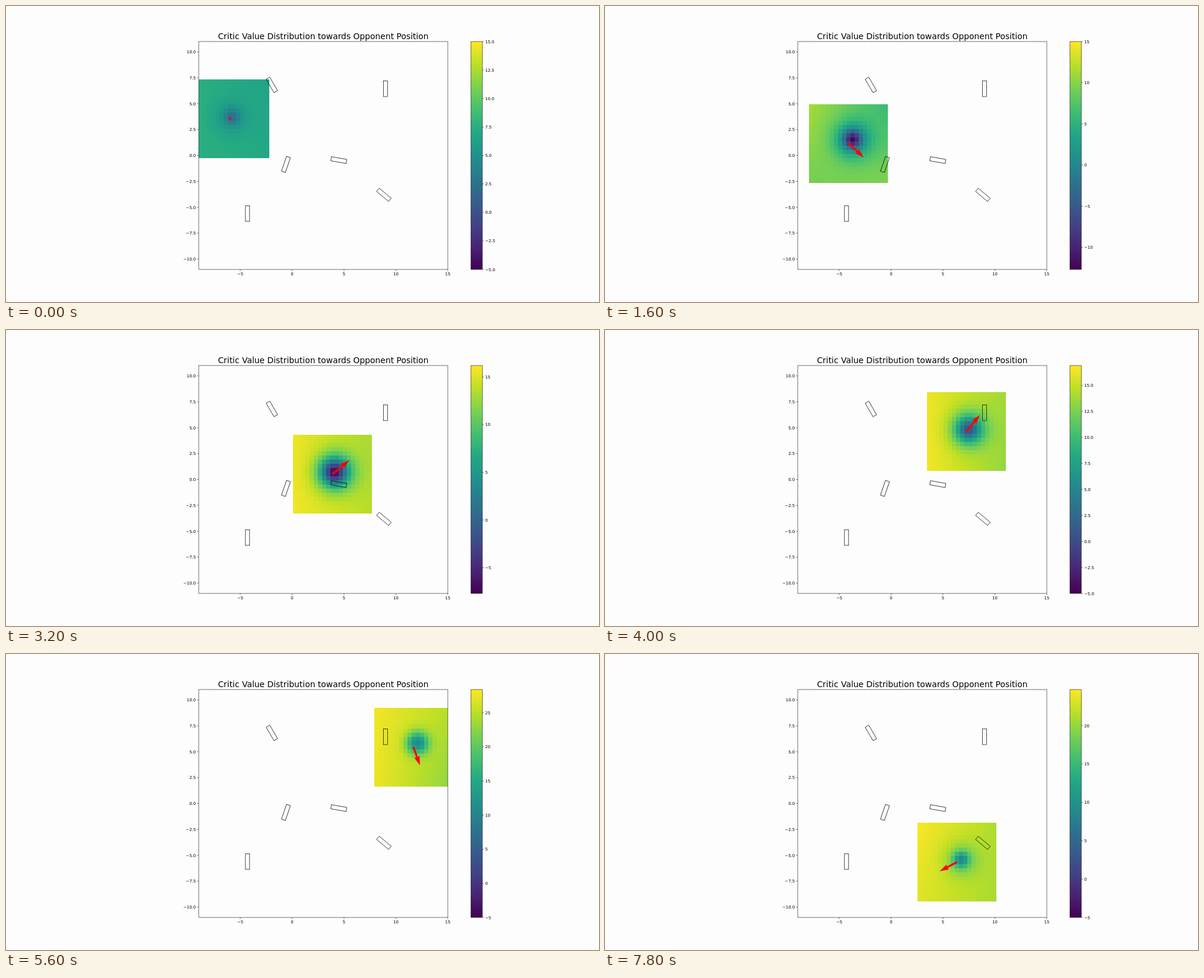
An HTML page for the animation above (8 s loop, 1000 by 500 pixels).

```html
<!DOCTYPE html>
<html lang="en">
<head>
<meta charset="utf-8">
<title>Critic value distribution</title>
<style>
  html, body { margin: 0; width: 100%; height: 100%; overflow: hidden; background: #fefdfe; }
  svg { display: block; width: 100vw; height: 100vh; }
  text { font-family: "DejaVu Sans", sans-serif; font-size: 6.94px; fill: #000; }
  .title { font-size: 13.89px; text-anchor: middle; }
  .mid { text-anchor: middle; }
  .end { text-anchor: end; }
  .line { fill: none; stroke: #000; stroke-width: .56; }
  .wall { fill: none; stroke: #000; stroke-width: .7; }
</style>
</head>
<body>
<svg viewBox="0 0 1000 500">
  <defs>
    <clipPath id="plot"><rect x="325" y="60" width="420" height="385"/></clipPath>
    <linearGradient id="scale" x1="0" y1="1" x2="0" y2="0"></linearGradient>
  </defs>
  <g clip-path="url(#plot)">
    <g id="patch" shape-rendering="crispEdges"></g>
    <g id="walls"></g>
    <path id="arrow" fill="#f00"/>
  </g>
  <rect class="line" x="325" y="60" width="420" height="385"/>
  <g id="axes"></g>
  <text class="title" x="535" y="55.8">Critic Value Distribution towards Opponent Position</text>
  <rect x="784" y="60" width="19.2" height="385" fill="url(#scale)"/>
  <rect class="line" x="784" y="60" width="19.2" height="385"/>
  <g id="ticks"></g>
</svg>
<script>
const LOOP = 8000, STEP = 200, N = 19, CELL = 7, PACE = 0.65;
const $ = id => document.getElementById(id);
const lerp = (a, b, u) => a + (b - a) * u;
const mix = (a, b, u) => a.map((v, i) => lerp(v, b[i], u));
const label = (v, digits) => v.toFixed(digits).replace("-", "\u2212");

const viridis = "440154 482475 414487 355f8d 2a788e 21918c 22a884 44bf70 7ad151 bddf26 fde725"
  .split(" ").map(h => [0, 2, 4].map(i => parseInt(h.slice(i, i + 2), 16)));

function color(v) {
  const s = Math.max(0, Math.min(0.9999, v)) * 10, i = Math.floor(s);
  return `rgb(${mix(viridis[i], viridis[i + 1], s - i).map(Math.round)})`;
}

// pos: patch centre; head: angle in degrees, length; range: colour limits;
// base: corner levels (tl, tr, bl, br); dip: offset x, y, then depth and width of two bells
const keys = [
  { t: 0,    pos: [377.5, 190],   head: [43, 0],     range: [-5, 15],      base: [.63, .585, .63, .6],  dip: [3, -3, .16, 9, .1, 20] },
  { t: 1600, pos: [410.5, 232],   head: [43, 35],    range: [-12.7, 15],   base: [.86, .68, .79, .8],   dip: [7, -7, .43, 10, .33, 22] },
  { t: 3200, pos: [550.5, 243.5], head: [-39.6, 37], range: [-7.7, 16.2],  base: [.97, .87, .98, .89],  dip: [3.5, -3.5, .45, 13, .46, 22] },
  { t: 4000, pos: [609.5, 171.5], head: [-51, 36],   range: [-5, 16.9],    base: [.97, .86, .98, .84],  dip: [3.5, -3.5, .3, 12, .36, 21] },
  { t: 5600, pos: [687, 157],     head: [70.5, 33],  range: [-5, 28.4],    base: [.98, .89, .97, .83],  dip: [6, -7, .25, 13, .2, 13] },
  { t: 7000, pos: [663.5, 285.5], head: [120.4, 33], range: [-5, 15],      base: [.86, .83, .91, .82],  dip: [7, -4, .4, 11, .22, 17] },
  { t: 7800, pos: [593.5, 351.5], head: [152, 33],   range: [-5, 24.7],    base: [.99, .88, .95, .87],  dip: [7, -4, .32, 9, .15, 20] }
];

const velocity = ([deg, len]) =>
  [Math.cos, Math.sin].map(f => f(deg * Math.PI / 180) * len * PACE / STEP);

// Hermite path whose end tangents follow the arrow
function glide(a, b, u) {
  const span = b.t - a.t, va = velocity(a.head), vb = velocity(b.head);
  const u2 = u * u, u3 = u2 * u, s = 3 * u2 - 2 * u3;
  return a.pos.map((p, i) => lerp(p, b.pos[i], s)
    + (u3 - 2 * u2 + u) * va[i] * span + (u3 - u2) * vb[i] * span);
}

function stateAt(t) {
  let i = 0;
  while (i < keys.length - 2 && t >= keys[i + 1].t) i++;
  const a = keys[i], b = keys[i + 1];
  const u = Math.min(1, (t - a.t) / (b.t - a.t));
  return {
    pos: glide(a, b, u),
    angle: lerp(a.head[0], b.head[0], u),
    length: lerp(a.head[1], b.head[1], u * u),
    range: mix(a.range, b.range, u),
    base: mix(a.base, b.base, u),
    dip: mix(a.dip, b.dip, u)
  };
}

function build() {
  $("scale").innerHTML = viridis.map((c, i) =>
    `<stop offset="${i / 10}" stop-color="rgb(${c})"/>`).join("");

  let cells = "";
  for (let j = 0; j < N; j++)
    for (let i = 0; i < N; i++)
      cells += `<rect x="${(i - N / 2) * CELL}" y="${(j - N / 2) * CELL}" width="${CELL}" height="${CELL}"/>`;
  $("patch").innerHTML = cells;

  const walls = [[448.4, 133.4, 60], [640, 139.8, 90], [472.1, 267.6, 109],
                 [561.2, 260.3, 10], [637.3, 319, 40], [407.3, 350.6, 90]];
  $("walls").innerHTML = walls.map(([x, y, r]) =>
    `<rect class="wall" x="-13.2" y="-3.5" width="26.4" height="7" transform="translate(${x} ${y}) rotate(${r})"/>`).join("");

  let axes = "";
  for (let v = -5; v <= 15; v += 5) {
    const x = 482.5 + v * 17.5;
    axes += `<path class="line" d="M${x} 445v2.5"/><text class="mid" x="${x}" y="455.1">${label(v, 0)}</text>`;
  }
  for (let v = -10; v <= 10; v += 2.5) {
    const y = 252.5 - v * 17.5;
    axes += `<path class="line" d="M325 ${y}h-2.5"/><text class="end" x="320.2" y="${y + 2.6}">${label(v, 1)}</text>`;
  }
  $("axes").innerHTML = axes;
}

function drawPatch({ pos, base, dip }) {
  const [tl, tr, bl, br] = base, [dx, dy, a, sa, b, sb] = dip;
  const cells = $("patch").children;
  $("patch").setAttribute("transform", `translate(${pos})`);
  for (let k = 0; k < cells.length; k++) {
    const i = k % N, j = Math.floor(k / N), u = i / (N - 1), v = j / (N - 1);
    const r2 = ((i - 9) * CELL - dx) ** 2 + ((j - 9) * CELL - dy) ** 2;
    const level = lerp(lerp(tl, tr, u), lerp(bl, br, u), v)
      - a * Math.exp(-r2 / (2 * sa * sa)) - b * Math.exp(-r2 / (2 * sb * sb));
    cells[k].setAttribute("fill", color(level));
  }
}

function drawArrow({ pos, angle, length }) {
  const w = 1.6, k = Math.min(1, length / 15.8);
  const neck = length - 14.2 * k, back = length - 15.8 * k;
  const dot = "M2.5 0L1.25 2.2H-1.25L-2.5 0L-1.25 -2.2H1.25Z";
  const shape = `M0 ${-w * k}H${neck}L${back} ${-4.75 * k}L${length} 0L${back} ${4.75 * k}L${neck} ${w * k}H0Z`;
  $("arrow").setAttribute("d", length < 3.2 ? dot : shape);
  $("arrow").setAttribute("transform", `translate(${pos}) rotate(${angle})`);
}

function drawTicks([lo, hi]) {
  const step = hi - lo <= 22.5 ? 2.5 : 5, digits = step === 5 ? 0 : 1;
  let out = "";
  for (let v = Math.ceil(lo / step - 1e-6) * step; v <= hi + 1e-6; v += step) {
    const y = 445 - (v - lo) / (hi - lo) * 385;
    out += `<path class="line" d="M803.2 ${y}h2.5"/><text x="808" y="${y + 2.6}">${label(v, digits)}</text>`;
  }
  $("ticks").innerHTML = out;
}

let shown = -1;
function render(now) {
  const t = Math.floor(now % LOOP / STEP) * STEP;
  if (t !== shown) {
    shown = t;
    const state = stateAt(t);
    drawPatch(state);
    drawArrow(state);
    drawTicks(state.range);
  }
  requestAnimationFrame(render);
}

build();
render(0);
</script>
</body>
</html>
```
